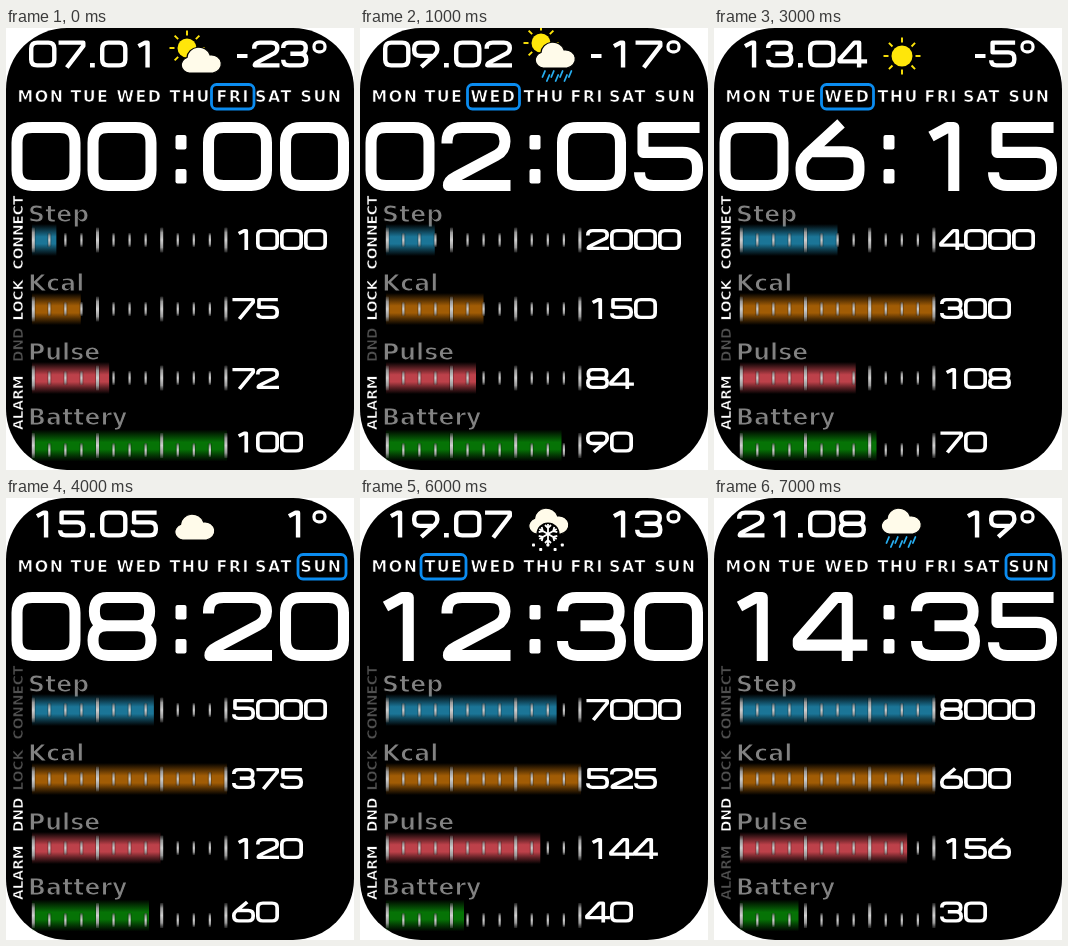
Animation, 348 px wide and 442 px high, one loop 8 s. Source, as an HTML page:

```html
<!DOCTYPE html>
<html lang="en">
<head>
<meta charset="utf-8">
<title>Watch face</title>
<style>
html, body { margin: 0; width: 100%; height: 100%; overflow: hidden; background: #fff; }
svg { display: block; width: 348px; height: 442px; }
/* A thin black outline lightens the wide bold face */
text { font-family: "DejaVu Sans", Inter, sans-serif; font-weight: bold; stroke: #000; }
.day { font-size: 15.8px; letter-spacing: 1.5px; fill: #fff; stroke-width: .6px; }
.label { font-size: 23.6px; fill: #828282; stroke-width: 1.2px; }
.status { font-size: 13.8px; stroke-width: .6px; }
.digit { fill: none; stroke: #fff; stroke-width: 16; stroke-linejoin: round; }
</style>
</head>
<body>
<svg viewBox="0 0 348 442" role="img" aria-label="Digital watch face">
  <defs id="defs"></defs>
  <rect width="348" height="442" rx="61" fill="#000"/>
  <g id="fixed"></g>
  <g id="live"></g>
  <g id="ticks"></g>
</svg>
<script>
const STEP = 1000, COUNT = 8;
const $ = id => document.getElementById(id);
const pad = n => String(n).padStart(2, "0");

// Numerals as centre lines in a 100 x 100 cell
const GLYPHS = [
  "M30 8H70Q92 8 92 30V70Q92 92 70 92H30Q8 92 8 70V30Q8 8 30 8Z",
  "M29 21L53 8H62V100",
  "M8 31V28Q8 8 30 8H70Q92 8 92 28Q92 42 80 48L20 80Q10 85 10 92H100",
  "M8 28Q8 8 28 8H70Q90 8 90 28Q90 49 70 49H34M70 49Q92 49 92 71Q92 92 70 92H30Q8 92 8 71",
  "M104 77H4V70L58 8H75V100",
  "M95 8H13V44H70Q92 44 92 66V70Q92 92 70 92H28Q8 92 8 73",
  "M66 2L18 46Q8 56 8 66V70Q8 92 30 92H70Q92 92 92 70V64Q92 43 70 43H24",
  "M2 8H92V20L32 100",
  "M28 8H72Q90 8 90 28Q90 49 72 49H28Q10 49 10 28Q10 8 28 8ZM28 49Q8 49 8 70Q8 92 30 92H70Q92 92 92 70Q92 49 72 49",
  "M34 98L82 54Q92 44 92 34V30Q92 8 70 8H30Q8 8 8 30V36Q8 57 30 57H76"
];

// Name, text x, highlight x, highlight width
const DAYS = [
  ["MON", 11.5, 8, 52], ["TUE", 64.5, 61, 45], ["WED", 110.5, 107.5, 52], ["THU", 163.5, 160, 46],
  ["FRI", 210.5, 205.5, 42.5], ["SAT", 249, 246, 44], ["SUN", 294.5, 292, 48]
];
const DAY_AT = [4, 2, 4, 2, 6, 4, 1, 6];
const HOURS = [0, 2, 22, 6, 8, 10, 12, 14];

const ROWS = [
  { name: "Step", base: 194, y: 212, num: 201, color: "#1b7597", value: i => (i + 1) * 1000, max: 8000 },
  { name: "Kcal", base: 263, y: 281, num: 270, color: "#a15c05", value: i => (i + 1) * 75, max: 300 },
  { name: "Pulse", base: 332, y: 350, num: 340, color: "#bd414a", value: i => 72 + i * 12, max: 182 },
  { name: "Battery", base: 397, y: 417.5, num: 403.5, color: "#067306", value: i => 100 - i * 10, max: 100 }
];

const STATUS = [
  ["CONNECT", 241.5, i => i < 4],
  ["LOCK", 292.5, i => i < 4],
  ["DND", 334, i => i === 2 || i > 3],
  ["ALARM", 402, i => i < 7]
];

const rect = (x, y, w, h, fill, rx = 0) =>
  `<rect x="${x}" y="${y}" width="${w}" height="${h}" rx="${rx}" fill="${fill}"/>`;

const digit = (d, x, y, w, h) =>
  `<path class="digit" d="${GLYPHS[d]}" transform="translate(${x} ${y}) scale(${w / 100} ${h / 100})"/>`;

const number = (n, xs, y, w, h) =>
  [...String(n)].map((d, k) => digit(d, xs[k], y, w, h)).join("");

function sun(x, y, r) {
  let rays = "";
  for (let k = 0; k < 8; k++)
    rays += `<path d="M0 ${-r - 3}V${-r - 8}" transform="rotate(${k * 45})"/>`;
  return `<g transform="translate(${x} ${y})" stroke="#ffe60a" stroke-width="1.9">${rays}` +
    `<circle r="${r}" fill="#ffe60a" stroke="none"/></g>`;
}

const cloud = (x, y) =>
  `<path transform="translate(${x} ${y}) scale(1.08 1)" fill="#fffbea" stroke="#000" stroke-width="1.2" ` +
  `d="M8 25A8 8 0 0 1 6 9.5A11 11 0 0 1 27.5 7A9 9 0 0 1 30 25Z"/>`;

function rain(x, y, len) {
  let d = "";
  for (let k = 0; k < 7; k++)
    d += `M${x + k * 4.4} ${y + (k % 2) * 4}l${-len * .42} ${len}`;
  return `<path d="${d}" stroke="#27aef0" stroke-width="1.8" stroke-linecap="round"/>`;
}

function snow(x, y) {
  let arms = "", dots = "";
  for (let k = 0; k < 6; k++)
    arms += `<path d="M0 0V-10M-3 -9L0 -6L3 -9" transform="rotate(${k * 60})"/>`;
  for (let k = 0; k < 5; k++)
    dots += rect(-16 + k * 7.2, k % 2 ? 14 : 9.5, 3, 3, "#fff", .8);
  return `<g transform="translate(${x} ${y})"><circle r="11.5"/>` +
    `<g fill="none" stroke="#fff" stroke-width="1.8">${arms}</g>${dots}</g>`;
}

const WEATHER = [
  () => sun(181, 20, 9.5) + cloud(174.5, 20),
  () => sun(181, 15, 9.5) + cloud(174.5, 15) + rain(185, 43, 6),
  () => sun(180, 12, 9.5) + cloud(173.5, 13) + snow(194, 37),
  () => sun(188, 28, 10.5),
  () => cloud(168, 17),
  () => cloud(168, 11) + rain(177, 39, 2.8),
  () => cloud(168, 11) + snow(188, 36),
  () => cloud(166.5, 11) + rain(175, 39, 6)
];

function temperature(t) {
  const s = String(Math.abs(t)), two = s.length > 1;
  return number(s, two ? [246, 275] : [275], 12.5, 27.5, 27) +
    (t < 0 ? rect(two ? 231 : 261, 26, 10.5, 4, "#fff") : "") +
    `<rect x="308" y="13.8" width="11" height="10" rx="4.5" fill="none" stroke="#fff" stroke-width="3.2"/>`;
}

function clock(i) {
  return number(pad(HOURS[i]) + pad(i * 5), [5.5, 81.5, 197, 274], 94, 69, 69);
}

function draw(i) {
  const [, , boxX, boxW] = DAYS[DAY_AT[i]];
  let out = number(pad(7 + i * 2) + pad(i + 1), [23, 52, 94, 124.5], 12.5, 27.5, 27);
  out += temperature(-23 + i * 6) + WEATHER[i]() + clock(i);
  out += `<rect x="${boxX}" y="56.5" width="${boxW}" height="24.5" rx="5" fill="none" stroke="#0b8cf0" stroke-width="2.8"/>`;
  for (const [name, y, on] of STATUS)
    out += `<text class="status" transform="translate(16.5 ${y}) rotate(-90)" fill="${on(i) ? "#fff" : "#505050"}">${name}</text>`;
  ROWS.forEach((row, k) => {
    const v = row.value(i), w = 195 * Math.min(1, v / row.max);
    out += rect(26, row.y - 16, w, 32, `url(#bar${k})`);
    out += number(v, [226, 250, 274, 298], row.num, 23, 21);
  });
  $("live").innerHTML = out;
}

function build() {
  const stop = (at, color, alpha = 1) =>
    `<stop offset="${at}" stop-color="${color}" stop-opacity="${alpha}"/>`;
  const gradient = (id, stops) =>
    `<linearGradient id="${id}" x2="0" y2="1">${stops}</linearGradient>`;

  $("defs").innerHTML = ROWS.map((r, k) => gradient("bar" + k,
    stop(0, r.color, 0) + stop(.2, r.color, .5) + stop(.4, r.color) +
    stop(.62, r.color) + stop(.8, r.color, .5) + stop(1, r.color, 0))).join("") +
    gradient("metal", stop(0, "#777", .3) + stop(.2, "#999") + stop(.5, "#cfcfcf") +
      stop(.8, "#999") + stop(1, "#777", .3));

  $("fixed").innerHTML =
    DAYS.map(([name, x]) => `<text class="day" x="${x}" y="74.3">${name}</text>`).join("") +
    ROWS.map(r => `<text class="label" x="22" y="${r.base}">${r.name}</text>`).join("") +
    rect(84, 35, 4.8, 4.5, "#fff") +
    rect(169.5, 107, 11, 14.5, "#fff", 2) + rect(169.5, 141, 11, 14.5, "#fff", 2);

  let ticks = "";
  ROWS.forEach((r, k) => {
    for (let n = 0; n <= 12; n++) {
      const x = 27.3 + n * 16.05, major = n % 4 === 0;
      const h = major ? 25 : 14, y = r.y - h / 2 + (k === 3 && !major ? 4.5 : 0);
      const w = major ? 3 : 2.2;
      ticks += rect(x - w / 2 - 1, y, w + 2, h, "rgba(0,0,0,.22)", 1) +
        rect(x - w / 2, y, w, h, "url(#metal)", .6);
    }
  });
  $("ticks").innerHTML = ticks;
}

let shown = -1;
const start = performance.now();
function frame(now) {
  const i = Math.floor(Math.max(0, now - start) / STEP) % COUNT;
  if (i !== shown) draw(shown = i);
  requestAnimationFrame(frame);
}

build();
frame(start);
</script>
</body>
</html>
```
